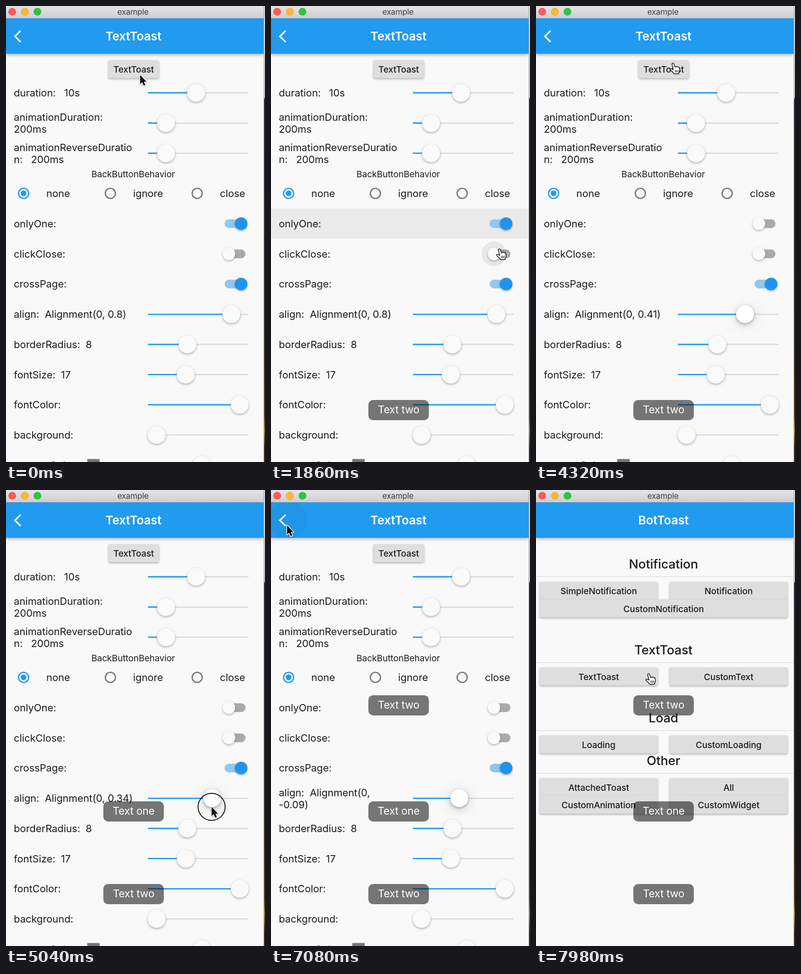
These frames come from a looping animation (564x993 px, 8000 ms). An HTML page with a canvas:

```html
<!DOCTYPE html>
<html lang="en">
<head>
<meta charset="utf-8">
<title>example</title>
<style>
html, body { margin: 0; width: 100%; height: 100%; overflow: hidden; }
canvas { display: block; }
</style>
</head>
<body>
<canvas id="stage" width="564" height="993"></canvas>
<script>
const ctx = document.getElementById('stage').getContext('2d');
const LOOP = 8000, STEP = 60, WIDTH = 561, MIDDLE = 277;
const BLUE = '#209bf0', INK = '#1c1c1c', PAPER = '#f9f9f9', GREY = '#757575';

// Cursor path: time, x, y
const path = [
  [0, 292, 150], [260, 292, 150], [360, 292, 132], [1260, 292, 130],
  [1760, 497, 529], [1900, 497, 529], [2080, 497, 470], [2300, 497, 470],
  [2640, 490, 735], [2820, 484, 688], [3000, 474, 686], [3540, 449, 688],
  [3660, 449, 688], [3900, 345, 255], [4080, 298, 124], [4560, 298, 125],
  [4920, 449, 690], [5000, 449, 690], [5400, 403, 690], [5460, 403, 690],
  [5820, 242, 133], [6300, 242, 133], [6780, 38, 82], [7020, 35, 77],
  [7100, 35, 77], [7400, 56, 70], [7680, 56, 70], [7920, 245, 400]
];
const align = [[2880, .8], [3000, .7], [3540, .41], [4980, .41], [5400, -.09]];
const presses = [[300, 420], [1140, 1240], [2140, 2240], [2800, 3560],
  [4480, 4590], [4960, 5420], [6140, 6250], [6850, 7010]];
const toasts = [
  { text: 'Text one', at: .8, from: 440, to: 1220 },
  { text: 'Text two', at: .8, from: 1260, to: Infinity },
  { text: 'Text one', at: .41, from: 4640, to: Infinity },
  { text: 'Text two', at: -.09, from: 6290, to: Infinity }
];

const arrow = new Path2D('M0 0V20L4.5 16L8 23.5L11.5 22L8.2 14.8H14Z');
const hand = new Path2D('M-2 1.8Q-.2-1.2 2 1L5 9Q6 6.5 8 8Q9.5 6.8 11 8.4Q14 8 14.5 11L15 16L12.5 23H3Q-1 18-6 14Q-6 11-2.5 12.3L1.2 14Z');
const knuckles = new Path2D('M5.5 15v5M8.2 15v5M11 15v5');
const chevron = new Path2D('M33 55L30.6 52.5L17 66L30.6 79.5L33 77L21.9 66Z');

const clamp = v => Math.max(0, Math.min(1, v));
const ramp = (t, from, length) => clamp((t - from) / length);
const smooth = u => u * u * (3 - 2 * u);
const visible = (t, from, to, fade) => ramp(t, from, fade) * (1 - ramp(t, to, fade));

function sample(keys, t, ease = u => u) {
  const next = keys.findIndex(k => k[0] > t);
  if (next < 1) return keys.at(next).slice(1);
  const a = keys[next - 1], b = keys[next];
  const u = ease((t - a[0]) / (b[0] - a[0]));
  return a.slice(1).map((v, i) => v + (b[i + 1] - v) * u);
}

function rect(x, y, w, h, color, radius = 0) {
  ctx.fillStyle = color;
  ctx.beginPath();
  ctx.roundRect(x, y, w, h, radius);
  ctx.fill();
}

function disc(x, y, r, color) {
  ctx.fillStyle = color;
  ctx.beginPath();
  ctx.arc(x, y, r, 0, 7);
  ctx.fill();
}

function ring(x, y, r, color, width) {
  ctx.strokeStyle = color;
  ctx.lineWidth = width;
  ctx.beginPath();
  ctx.arc(x, y, r, 0, 7);
  ctx.stroke();
}

// y is the middle of the capitals
function text(str, x, y, { size = 22, weight = 400, color = INK, anchor = 'left' } = {}) {
  ctx.font = `${weight} ${size}px Inter, sans-serif`;
  ctx.textAlign = anchor;
  ctx.fillStyle = color;
  ctx.fillText(str, x, y + size * .364);
}

function shadowed(blur, dy, alpha, draw) {
  ctx.save();
  ctx.shadowColor = `rgba(0,0,0,${alpha})`;
  ctx.shadowBlur = blur;
  ctx.shadowOffsetY = dy;
  draw();
  ctx.restore();
}

function slider(x, y, lifted) {
  rect(309, y - 1.4, 219, 2.8, '#dcdcdc');
  rect(309, y - 1.4, x - 309, 2.8, BLUE);
  if (lifted) shadowed(22, 4, .18, () => disc(x, y, 19.5, '#fff'));
  shadowed(5, 2, .32, () => disc(x, y, 19.5, lifted ? '#fff' : '#fafafa'));
}

function toggle(y, on, glow = 0) {
  const x = 485.5 + 26.5 * on;
  rect(476, y - 9.5, 45.5, 19, on > .5 ? '#93c7f0' : '#a9a9a9', 9.5);
  if (glow) disc(x, y, 27, `rgba(0,0,0,${.07 * glow})`);
  shadowed(4, 2, .3, () => disc(x, y, 13.7, on > .5 ? '#2094ec' : '#fafafa'));
}

function radio(x, label, on) {
  ring(x, 408, 11, on ? BLUE : GREY, 2.7);
  if (on) disc(x, 408, 6.2, BLUE);
  text(label, x + 49.5, 408);
}

function button(label, x, y, w, h = 39, color = '#dedede') {
  shadowed(4, 2, .3, () => rect(x, y, w, h, color, 3));
  text(label, x + w / 2, y + 20.5, { size: 19.2, weight: 500, anchor: 'center' });
}

function page(title) {
  rect(0, 27, WIDTH, 966, PAPER);
  shadowed(7, 2, .35, () => rect(0, 27, WIDTH, 77, BLUE));
  text(title, MIDDLE + .5, 66, { size: 26, weight: 600, color: '#fff', anchor: 'center' });
}

function settings(t) {
  page('TextToast');
  const backGlow = ramp(t, 6780, 120);
  if (backGlow) {
    ctx.save();
    ctx.beginPath();
    ctx.rect(0, 27, WIDTH, 77);
    ctx.clip();
    disc(38, 66, 42, `rgba(0,0,0,${.035 * backGlow})`);
    ctx.restore();
  }
  ctx.fillStyle = '#fff';
  ctx.fill(chevron);

  const hovered = visible(t, 5780, 6320, 80);
  button('TextToast', 223, 118, 110, 39, hovered > .5 ? '#d6d6d6' : '#dedede');

  text('duration:   10s', 17, 189);
  text('animationDuration:', 17, 242);
  text('200ms', 17, 268);
  text('animationReverseDuratio', 17, 307.5);
  text('n:   200ms', 17, 333.5);
  slider(414, 189);
  slider(348.5, 255);
  slider(348.5, 320.7);

  text('BackButtonBehavior', MIDDLE, 366, { size: 19.2, anchor: 'center' });
  radio(38.3, 'none', true);
  radio(227.3, 'ignore');
  radio(416.3, 'close');

  const rowGlow = visible(t, 1680, 2420, 120);
  if (rowGlow) rect(0, 441, WIDTH, 65.5, `rgba(0,0,0,${.057 * rowGlow})`);
  ['onlyOne:', 'clickClose:', 'crossPage:'].forEach((label, i) => text(label, 17, 474 + i * 65.7));
  toggle(474, 1 - smooth(ramp(t, 2220, 200)));
  toggle(539.7, 0, visible(t, 1740, 1920, 100));
  toggle(605.4, 1);

  const [value] = sample(align, t);
  const shown = Number(value.toFixed(2));
  if (shown < 0) {
    text('align:  Alignment(0,', 17, 658.5);
    text(shown + ')', 17, 684.5);
  } else {
    text(`align:  Alignment(0, ${shown})`, 17, 671.3);
  }
  slider(418 + 91 * value, 671.3, t > 2760);

  [['borderRadius:  8', 395], ['fontSize:  17', 391.5], ['fontColor:', 509],
    ['background:', 328], ['contentColor:', 426]].forEach(([label, x], i) => {
    const y = 737 + i * 65.7;
    text(label, 17, y);
    slider(x, y);
  });
  rect(177, 986.5, 27, 27, GREY);
}

function home() {
  page('BotToast');
  [['Notification', 161], ['TextToast', 348], ['Load', 496], ['Other', 589]].forEach(([label, y]) => {
    text(label, MIDDLE + .5, y, { size: 27.4, weight: 500, anchor: 'center' });
    rect(0, y + 27, WIDTH, 1.4, '#dfdfdf');
  });
  const pair = (left, right, y) => {
    button(left, 8, y, 257);
    button(right, 291, y, 257);
  };
  pair('SimpleNotification', 'Notification', 200);
  button('CustomNotification', 8, 238.5, 540);
  pair('TextToast', 'CustomText', 386.5);
  pair('Loading', 'CustomLoading', 534.5);
  pair('AttachedToast', 'All', 627.5);
  pair('CustomAnimation', 'CustomWidget', 666);
}

function pages(t) {
  const u = ramp(t, 7100, 400), p = 1 - (1 - u) ** 2;
  ctx.save();
  ctx.beginPath();
  ctx.rect(0, 27, WIDTH, 966);
  ctx.clip();
  if (p > 0) {
    ctx.save();
    ctx.translate(-WIDTH / 3 * (1 - p), 0);
    home();
    ctx.restore();
  }
  if (p < 1) {
    ctx.translate(WIDTH * p, 0);
    if (p > 0) shadowed(20, 0, .25, () => rect(0, 27, WIDTH, 966, PAPER));
    settings(t);
  }
  ctx.restore();
}

function toast({ text: label, at, from, to }, t) {
  const shown = visible(t, from, to, 200);
  if (!shown) return;
  const y = 510.5 + 462 * at + 31 * (1 - smooth(shown));
  ctx.save();
  ctx.globalAlpha = shown;
  rect(212, y - 22, 131.7, 44, 'rgba(0,0,0,.53)', 10.5);
  text(label, 278, y - 1, { size: 22.6, color: '#fff', anchor: 'center' });
  ctx.restore();
}

function windowFrame() {
  const bar = ctx.createLinearGradient(0, 0, 0, 27);
  bar.addColorStop(0, '#e6e4e6');
  bar.addColorStop(1, '#cfcdcf');
  rect(0, 0, WIDTH, 27, bar);
  rect(0, 26, WIDTH, 1, '#b9b4b4');
  ['#fc5b57', '#fdb82e', '#2ac63f'].forEach((color, i) => {
    disc(13.5 + i * 27.5, 12.5, 8.3, color);
    ring(13.5 + i * 27.5, 12.5, 8, 'rgba(0,0,0,.12)', 1);
  });
  text('example', MIDDLE - .5, 13, { size: 17.3, color: '#404040', anchor: 'center' });

  const desk = ctx.createLinearGradient(0, 0, 0, 993);
  [[0, '#dcdcdc'], [.2, '#c4c4c8'], [.205, '#2b2b30'], [.7, '#38302c'],
    [.9, '#5a4020'], [.93, '#a8802c'], [.97, '#3a2c1c']].forEach(s => desk.addColorStop(...s));
  rect(WIDTH, 0, 3, 993, desk);
  rect(WIDTH, 0, 1, 993, '#a5a5a5');
}

function cursor(t) {
  const [x, y] = sample(path, t, smooth);
  const inBox = (l, top, r, b) => x > l && x < r && y > top && y < b;
  const overHome = t > 7500 && inBox(8, 386, 265, 425);
  const overSettings = t > 260 && t < 7100 && (inBox(223, 118, 333, 157) || inBox(460, 441, WIDTH, 638));
  if (presses.some(([from, to]) => t >= from && t < to)) ring(x, y, 29.5, '#111', 2);
  ctx.save();
  ctx.translate(x, y);
  ctx.lineJoin = 'round';
  if (overHome || overSettings) {
    ctx.fillStyle = '#fff';
    ctx.strokeStyle = '#111';
    ctx.lineWidth = 1.5;
    shadowed(3, 1, .3, () => ctx.fill(hand));
    ctx.stroke(hand);
    ctx.lineWidth = 1.2;
    ctx.stroke(knuckles);
  } else {
    ctx.strokeStyle = '#fff';
    ctx.lineWidth = 3;
    shadowed(3, 1, .3, () => ctx.stroke(arrow));
    ctx.fillStyle = '#111';
    ctx.fill(arrow);
  }
  ctx.restore();
}

function draw() {
  const t = Math.floor(performance.now() % LOOP / STEP) * STEP;
  pages(t);
  toasts.forEach(item => toast(item, t));
  windowFrame();
  cursor(t);
  requestAnimationFrame(draw);
}

ctx.letterSpacing = '-0.1px';
draw();
</script>
</body>
</html>
```
